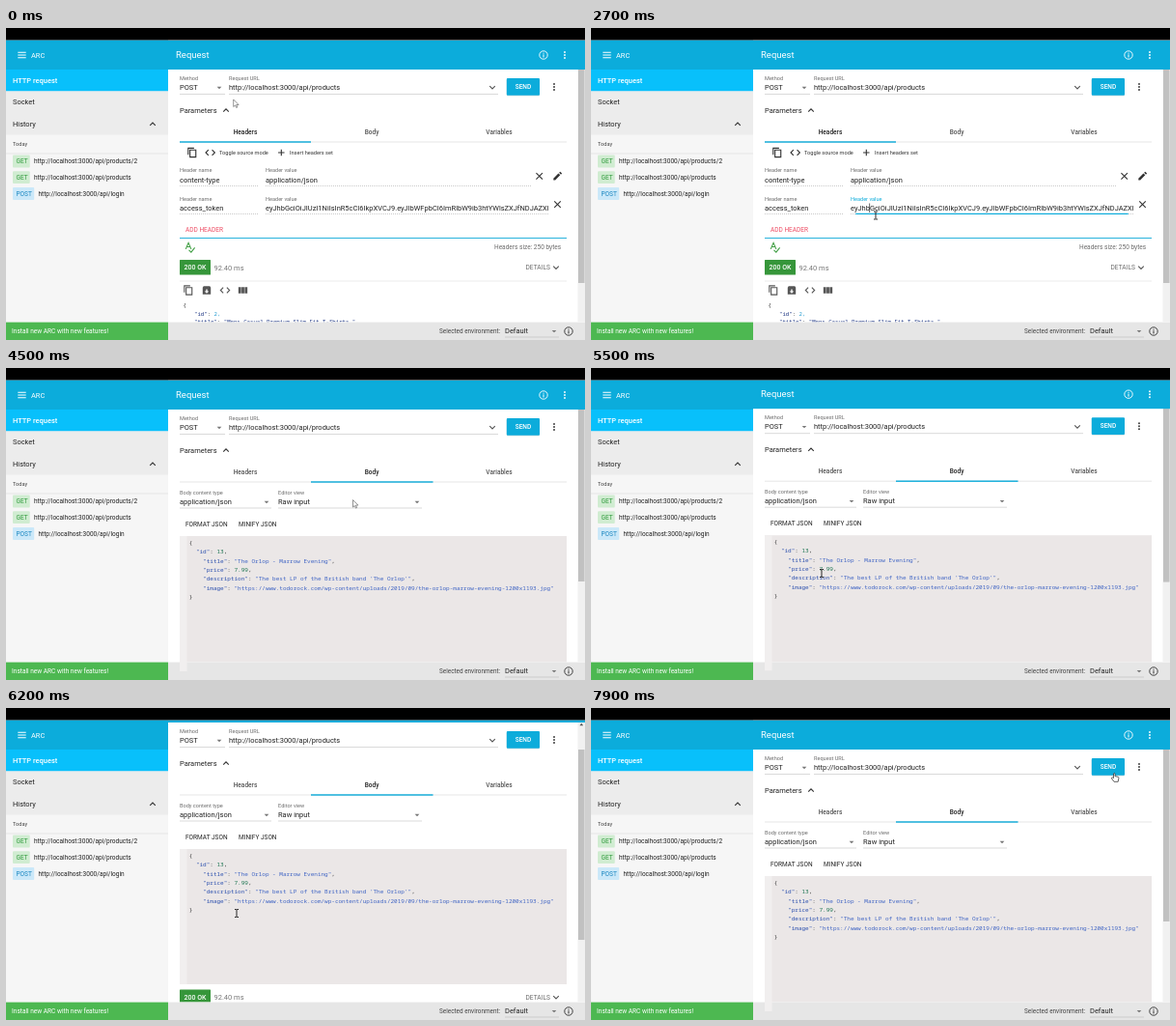
An HTML page that plays this animation: 600 by 323 pixels, repeating every 8 s.

```html
<!DOCTYPE html>
<html lang="en">
<head>
<meta charset="utf-8">
<title>API request</title>
<style>
html, body { margin: 0; width: 100%; height: 100%; overflow: hidden; background: #fff; }
svg { display: block; width: 600px; height: 323px; }
text { font-family: Roboto, Arial, sans-serif; white-space: pre; }
.mono { font-family: "Noto Sans Mono", "Liberation Mono", monospace; }
</style>
</head>
<body>
<svg id="stage" viewBox="0 0 600 323" xmlns="http://www.w3.org/2000/svg"></svg>
<script>
const LOOP = 8000;
const BLUE = '#0cacdb', INK = '#222', GREY = '#6c6c6c', LINE = '#cbcbcb';
const TOP = 12.5, LEFT = 168, FOOT = 304.6;

// ---- drawing helpers (y is the vertical centre of text and icons) ----
const rect = (x, y, w, h, fill, extra = '') =>
  `<rect x="${x}" y="${y}" width="${w}" height="${h}" fill="${fill}" ${extra}/>`;
const text = (x, y, str, size = 7.47, fill = INK, extra = '') =>
  `<text x="${x}" y="${y + size * 0.35}" font-size="${size}" fill="${fill}" ${extra}>${str}</text>`;
const bold = (x, y, str, size, fill, extra = '') =>
  text(x, y, str, size, fill, 'font-weight="500" ' + extra);
const label = (x, y, str, fill = GREY, extra = '') => text(x, y, str, 5.6, fill, extra);
const rule = (x1, x2, y, color = LINE, extra = '') =>
  `<path d="M${x1} ${y}H${x2}" stroke="${color}" stroke-width=".7" ${extra}/>`;
const dotted = (x1, x2, y) => rule(x1, x2, y, '#b4b4b4', 'stroke-dasharray="1 1"');
const icon = (x, y, d, color = '#333', fill = 'none') =>
  `<path transform="translate(${x} ${y}) scale(.467)" d="${d}" fill="${fill}" stroke="${color}" stroke-width="2.4"/>`;
const solid = (x, y, d, color = '#333') =>
  `<path transform="translate(${x} ${y}) scale(.467)" d="${d}" fill="${color}"/>`;
const group = (id, body, extra = '') => `<g id="${id}" ${extra}>${body}</g>`;

const D = {
  menu: 'M-9-6H9M-9 0H9M-9 6H9',
  down: 'M-6-3L0 3L6-3',
  up: 'M-6 3L0-3L6 3',
  close: 'M-7-7L7 7M7-7L-7 7',
  plus: 'M-7 0H7M0-7V7',
  code: 'M-4-6L-10 0L-4 6M4-6L10 0L4 6',
  copy: 'M-9 5V-10H4M-5-6H8V10H-5Z',
  caret: 'M-5-2.5H5L0 2.5Z',
  pencil: 'M-9 9V5L2-6L6-2L-5 9ZM3.5-7.5L6-10L10-6L7.5-3.5Z',
  columns: 'M-10-7H-4V7H-10ZM-3-7H3V7H-3ZM4-7H10V7H4Z',
  archive: 'M-9-6L-7-9H7L9-6V9H-9ZM-1.5-2V2H-5L0 7L5 2H1.5V-2Z',
};
const info = (x, y, color) =>
  `<circle cx="${x}" cy="${y}" r="4.2" fill="none" stroke="${color}" stroke-width=".9"/>` +
  rect(x - .5, y - .6, 1, 3, color) + rect(x - .5, y - 2.3, 1, 1, color);
const kebab = (x, y, color) =>
  [-3, 0, 3].map(d => `<circle cx="${x}" cy="${y + d}" r=".95" fill="${color}"/>`).join('');

// ---- static regions ----
function drawer() {
  const item = (y, verb, w, url, bg, fg) =>
    rect(7, y - 6.4, w, 12.8, bg, 'rx="1"') + text(10.5, y, verb, 6.54, fg) +
    text(w + 11.3, y, url, 6.54);
  const base = 'http://localhost:3000/api/';
  return rect(0, TOP, LEFT, 292, '#f6f6f6') + rect(0, TOP, LEFT, 30.5, BLUE) +
    icon(16.5, 28, D.menu, '#fff') + text(26, 28, 'ARC', 7.47, '#fff') +
    rect(0, 43, LEFT, 22.5, '#08c0fb') + bold(7, 54.4, 'HTTP request', 7.47, '#fff') +
    rect(0, 65.5, LEFT, 45, '#ececec') + text(7, 76.7, 'Socket') +
    text(7, 99.4, 'History') + icon(152, 99.5, D.up) +
    label(7, 119.8, 'Today', '#444') + rule(0, LEFT, 130, '#dedede') +
    item(138, 'GET', 17.7, base + 'products/2', '#d0ecd1', '#2f9a3c') +
    item(154.7, 'GET', 17.7, base + 'products', '#d0ecd1', '#2f9a3c') +
    item(171.5, 'POST', 22.2, base + 'login', '#cbe8f9', '#1a86c0') +
    rect(0, FOOT, LEFT, 19, '#4db851') +
    text(6, 314, 'Install new ARC with new features!', 6.54, '#fff');
}

function footer() {
  return rect(LEFT, FOOT, 432, 19, '#e6e6e6') +
    text(449, 313.8, 'Selected environment:', 6.4, '#444') + text(517, 313.6, 'Default') +
    rule(517, 573, 320, '#c0c0c0') + solid(568, 314.2, D.caret, '#777') + info(583, 314, '#333');
}

function urlBar() {
  return label(180, 51.7, 'Method') + text(180, 61.6, 'POST') +
    solid(221, 62, D.caret, '#777') + rule(180, 227, 68.5) +
    label(231, 51.7, 'Request URL') + text(231, 61.6, 'http://localhost:3000/api/products') +
    icon(504, 61.5, D.down, '#555') + rule(231, 510, 68.5) +
    rect(518.7, 52.7, 34.4, 17.8, '#0000001c', 'rx="1.5"') +
    rect(518.8, 52, 34.2, 17.8, BLUE, 'rx="1"') +
    bold(536, 61, 'SEND', 6.54, '#fff', 'text-anchor="middle"') + kebab(568, 61, '#333') +
    text(180, 85.2, 'Parameters') + icon(228, 85.3, D.up);
}

function tabs() {
  const tab = (x, str) =>
    bold(x, 107.7, str, 6.54, '#555', `text-anchor="middle" id="tab${str}"`);
  return `<clipPath id="tabClip"><rect x="316" y="97" width="127" height="21"/></clipPath>` +
    `<circle id="ripple" cx="384.5" cy="118" r="0" fill="${BLUE}" clip-path="url(#tabClip)"/>` +
    rule(180, 581, 118, '#dcdcdc') + tab(248, 'Headers') + tab(379, 'Body') + tab(511, 'Variables') +
    `<rect id="tabLine" y="117.3" height="1.4" fill="${BLUE}"/>`;
}

const status = y =>
  rect(180, y - 8, 32, 15.5, '#36963a', 'rx=".6"') +
  bold(196, y, '200 OK', 7, '#fff', 'text-anchor="middle"') +
  text(215.5, y, '92.40 ms', 7.47, '#777') +
  text(538.5, y, 'DETAILS', 6.6, GREY) + icon(570, y, D.down, '#555');

// Each part is [colour, text]; one line of code is a list of parts.
const codeLine = (x, y, size, parts) =>
  `<text class="mono" x="${x}" y="${y + size * .32}" font-size="${size}">` +
  parts.map(([c, s]) => `<tspan fill="${c}">${s}</tspan>`).join('') + '</text>';

function headersTab() {
  const token = 'eyJhbGciOiJIUzI1NiIsInR5cCI6IkpXVCJ9.eyJlbWFpbCI6ImRlbW9ib3htYWlsZXJfNDJAZXhh';
  const navy = '#17307f';
  return icon(193, 129, D.copy) + icon(211.7, 129, D.code) + label(221, 129, 'Toggle source mode', '#333') +
    icon(285.3, 129, D.plus) + label(294, 129, 'Insert headers set', '#333') +
    label(180, 147.3, 'Header name') + label(269, 147.3, 'Header value') +
    text(180, 157, 'content-type') + text(269, 157, 'application/json') +
    dotted(180, 261, 163.5) + dotted(269, 544, 163.5) +
    icon(552.7, 153.3, D.close) + solid(571.5, 153.3, D.pencil) +
    label(180, 176.6, 'Header name') + label(269, 176.6, 'Header value', GREY, 'id="valueLabel"') +
    text(180, 186.4, 'access_token') +
    `<clipPath id="tokenClip"><rect x="268" y="178" width="294" height="16"/></clipPath>` +
    `<g clip-path="url(#tokenClip)">${text(269, 186.4, token)}</g>` +
    dotted(180, 261, 192.5) + dotted(269, 562, 192.5) +
    `<rect id="focusLine" y="191.8" height="1.2" fill="${BLUE}"/>` +
    rect(288.4, 181.5, .7, 9.5, '#222', 'id="caret"') +
    icon(571.5, 182.7, D.close) +
    text(186, 209.2, 'ADD HEADER', 6.54, '#ee4f66') + rect(180, 217, 401, 1, '#2bb3dd') +
    icon(190, 227, 'M-8 4L-2-10L4 4M-6-1H2M-1 6L4 11L12 1', '#43a047') +
    text(506, 226.7, 'Headers size: 250 bytes', 6.54, GREY) +
    status(248) + rule(180, 581, 262, '#e2e2e2') +
    icon(189, 271.5, D.copy, '#555') + solid(208, 271.5, D.archive, '#555') +
    icon(227, 271.5, D.code, '#555') + solid(245.5, 271.5, D.columns, '#555') +
    codeLine(183.5, 287.5, 5.7, [['#222', '{']]) +
    codeLine(195, 296, 5.7, [[navy, '"id"'], ['#222', ': '], ['#249bd0', '2,']]) +
    codeLine(195, 304.5, 5.7, [[navy, '"title"'], ['#222', ': '],
      [navy, '"Mens Casual Premium Slim Fit T-Shirts "'], ['#222', ',']]);
}

function bodyTab() {
  const select = (x, w, name, value) => label(x, 129, name) + text(x, 138.5, value) +
    solid(x + w - 5, 139, D.caret, '#777') + rule(x, x + w, 145);
  const fields = [
    ['id', '13', 2], ['title', '"The Orlop - Marrow Evening"', 4], ['price', '7.99', 4],
    ['description', `"The best LP of the British band 'The Orlop'"`, 4],
    ['image', '"https://www.todorock.com/wp-content/uploads/2019/09/the-orlop-marrow-evening-1200x1193.jpg"', 4],
  ];
  const row = (i, parts, indent = 0) => codeLine(189.7 + indent * 3.6, 181 + i * 9.35, 6, parts);
  const lines = fields.map(([key, value, indent], i) => row(i + 1, [
    ['#2c50ae', `"${key}"`], ['#333', ': '],
    [value[0] === '"' ? '#3f64c4' : '#19734f', value],
    ['#333', i < fields.length - 1 ? ',' : ''],
  ], indent));
  return select(180, 95, 'Body content type', 'application/json') +
    select(282, 149, 'Editor view', 'Raw input') +
    text(186, 161.3, 'FORMAT JSON', 6.5) + text(241, 161.3, 'MINIFY JSON', 6.5) +
    rect(180, 174, 401, 140, '#ebe7e7') +
    row(0, [['#333', '{']]) + lines.join('') + row(6, [['#333', '}']]) + status(327.5);
}

const header = rect(LEFT, TOP, 432, 30.5, BLUE) + text(176, 27.8, 'Request', 9.5, '#fff') +
  info(557, 28, '#fff') + kebab(579, 28, '#fff');

const scrollbar = rect(592.5, TOP, 7.5, 292, '#f1f1f1') +
  solid(596.3, 17, 'M-4 2.5H4L0-2.5Z', '#555') + rect(593, 24, 6.5, 197, '#c1c1c1', 'id="thumb"');

const pointers =
  group('arrow', '<path d="M0 0V7.5L1.8 6L3 8.5L4.1 8L3 5.5H5.4Z" fill="#fff" stroke="#666" stroke-width=".7"/>') +
  group('beam', '<path d="M-2-4H-.6L0-3.5L.6-4H2M0-3.5V3.5M-2 4H-.6L0 3.5L.6 4H2" fill="none" stroke="#111" stroke-width=".9"/>') +
  group('hand', '<path d="M-1.5 1V-3.6Q-.8-4.8 0-3.6V-.9L3.2-.2Q4 .2 3.9 1L3.2 4.8H-1L-3.6 1.3Q-3.4.2-2.5.4Z" fill="#fff" stroke="#222" stroke-width=".7"/>');

document.getElementById('stage').innerHTML =
  rect(0, 0, 600, 323, '#fff') +
  `<clipPath id="mainClip">${rect(LEFT, TOP, 432, FOOT - TOP, '#000')}</clipPath>` +
  `<g clip-path="url(#mainClip)">` +
    group('page', urlBar() + tabs() + group('headersPane', headersTab()) + group('bodyPane', bodyTab())) +
    scrollbar + group('header', header) +
  `</g>` + footer() +
  group('gutter', rect(180, 174, 7.5, 140, '#f1efef')) +
  drawer() + rect(0, 0, 600, TOP, '#000') + group('cursor', pointers);

// ---- motion ----
const $ = id => document.getElementById(id);
const set = (id, attrs) => Object.entries(attrs).forEach(([k, v]) => $(id).setAttribute(k, v));
const show = (id, on) => set(id, { visibility: on ? 'visible' : 'hidden' });
const span = (t, from, to) => Math.min(1, Math.max(0, (t - from) / (to - from)));
const smooth = p => p * p * (3 - 2 * p);
const easeOut = p => 1 - (1 - p) ** 3;
const mix = (a, b, p) => a + (b - a) * p;

// time, x, y, pointer
const path = [
  [0, 235.7, 74, 'arrow'], [700, 235.7, 74, 'arrow'], [1600, 268, 150, 'arrow'],
  [2200, 294, 190, 'beam'], [2600, 295, 194, 'beam'], [3150, 295, 194, 'arrow'],
  [3700, 387.5, 118.5, 'hand'], [4350, 387.5, 118.5, 'arrow'], [4750, 300, 175, 'beam'],
  [5150, 239, 212.5, 'beam'], [7150, 239, 212.5, 'arrow'], [7750, 543, 71.5, 'hand'],
  [LOOP, 543, 71.5, 'hand'],
];

function draw(t) {
  const i = path.findIndex((k, n) => path[n + 1][0] > t);
  const a = path[i], b = path[i + 1];
  const p = smooth(span(t, a[0], b[0]));
  set('cursor', { transform: `translate(${mix(a[1], b[1], p)} ${mix(a[2], b[2], p)})` });
  ['arrow', 'beam', 'hand'].forEach(id => show(id, id === a[3]));

  const focused = t >= 2500 && t < 3800;
  const half = 146.5 * easeOut(span(t, 2500, 2800));
  show('focusLine', focused);
  show('caret', focused && (t - 2500) % 1000 < 500);
  set('focusLine', { x: 415.5 - half, width: half * 2 });
  set('valueLabel', { fill: focused ? BLUE : GREY });

  const inBody = t >= 4150;
  for (const id of ['bodyPane', 'gutter']) show(id, inBody);
  show('headersPane', !inBody);
  set('tabHeaders', { fill: inBody ? '#555' : INK });
  set('tabBody', { fill: inBody ? INK : '#555' });
  set('ripple', { r: 50 * easeOut(span(t, 3780, 4000)) + 20 * span(t, 4000, 4300),
    'fill-opacity': .25 * (1 - span(t, 4050, 4400)) });
  const slide = smooth(span(t, 4100, 4350));
  set('tabLine', { x: mix(180, 316, slide), width: mix(136, 126.5, slide) });

  const scroll = 28 * (smooth(span(t, 5450, 5950)) - smooth(span(t, 6420, 6920)));
  const shift = { transform: `translate(0 ${-scroll})` };
  for (const id of ['page', 'header', 'gutter']) set(id, shift);
  set('thumb', { y: 24 + scroll * .68, height: inBody ? 197 : 240 });
}

function tick() {
  draw(performance.now() % LOOP);
  requestAnimationFrame(tick);
}
tick();
</script>
</body>
</html>
```
